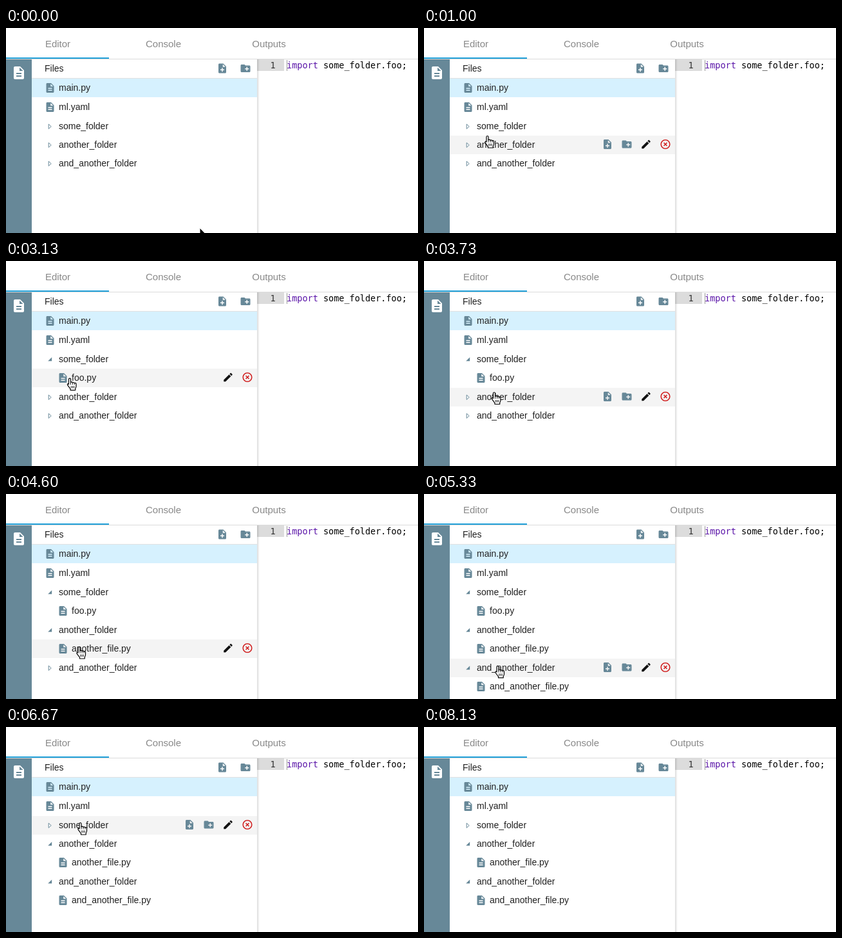
Recreate the animation shown at these times as an HTML page. Size 640 px wide and 320 px high, loop 8190 ms.

```html
<!DOCTYPE html>
<html lang="en">
<head>
<meta charset="utf-8">
<title>File tree</title>
<style>
html, body { margin: 0; width: 100%; height: 100%; overflow: hidden; background: #fff; }
svg { display: block; width: 640px; height: 320px; }
text { font: 14px "Liberation Sans", Arial, sans-serif; fill: #212121; white-space: pre; }
.tab { font-size: 15px; fill: #888; text-anchor: middle; }
.code { font: 13.5px "DejaVu Sans Mono", monospace; fill: #000; }
</style>
</head>
<body>
<svg viewBox="0 0 640 320">
  <defs>
    <linearGradient id="edge">
      <stop stop-opacity=".14"/><stop offset="1" stop-opacity="0"/>
    </linearGradient>
    <path id="file" d="M14 2H6c-1.1 0-1.99.9-1.99 2L4 20c0 1.1.89 2 1.99 2H18c1.1 0 2-.9 2-2V8l-6-6zm2 16H8v-2h8v2zm0-4H8v-2h8v2zm-3-5V3.5L18.5 9H13z"/>
    <path id="addFile" d="M14 2H6c-1.1 0-1.99.9-1.99 2L4 20c0 1.1.89 2 1.99 2H18c1.1 0 2-.9 2-2V8l-6-6zm2 14h-3v3h-2v-3H8v-2h3v-3h2v3h3v2zm-3-7V3.5L18.5 9H13z"/>
    <path id="addFolder" d="M20 6h-8l-2-2H4c-1.11 0-1.99.89-1.99 2L2 18c0 1.11.89 2 2 2h16c1.11 0 2-.89 2-2V8c0-1.11-.89-2-2-2zm-1 8h-3v3h-2v-3h-3v-2h3V9h2v3h3v2z"/>
    <path id="edit" d="M3 17.25V21h3.75L17.81 9.94l-3.75-3.75L3 17.25zM20.71 7.04c.39-.39.39-1.02 0-1.41l-2.34-2.34c-.39-.39-1.02-.39-1.41 0l-1.83 1.83 3.75 3.75 1.83-1.83z"/>
    <path id="remove" d="M14.59 8L12 10.59 9.41 8 8 9.41 10.59 12 8 14.59 9.41 16 12 13.41 14.59 16 16 14.59 13.41 12 16 9.41 14.59 8zM12 2C6.47 2 2 6.47 2 12s4.47 10 10 10 10-4.47 10-10S17.53 2 12 2zm0 18c-4.41 0-8-3.59-8-8s3.59-8 8-8 8 3.59 8 8-3.59 8-8 8z"/>
    <path id="arrow" d="M0 0V15l3.4-3.3 2.3 5.3 2.3-1-2.2-5.2H10.5Z" stroke="#fff"/>
    <g id="hand" stroke="#000" stroke-linejoin="round">
      <path fill="#fff" stroke-width="1.2" d="M-1.5 1.5Q-1.5 0 0 0T1.5 1.5V6.5Q1.8 5.7 3 5.7T4.6 7Q5 6.4 6 6.4T7.5 7.7Q7.8 7.2 8.6 7.2Q10 7.2 10 9V12.5Q10 14 8.7 16V18.5H1V16.5Q-1 14-3.4 10.6Q-4 9-3 8.6Q-2 8.3-1.5 9.5Z"/>
      <path fill="none" stroke-width=".9" d="M2.3 12v3.5M4.5 12v3.5M6.7 12v3.5M1.5 6v4M4.6 7v3M7.5 8v2"/>
    </g>
  </defs>

  <rect width="640" height="320" fill="#fff"/>
  <rect y="48" width="640" height="1" fill="#dcdcdc"/>
  <rect y="46" width="160" height="2" fill="#1e9fd8"/>
  <text class="tab" x="80.5" y="30">Editor</text>
  <text class="tab" x="244.5" y="30">Console</text>
  <text class="tab" x="408.5" y="30">Outputs</text>

  <rect y="49" width="40" height="271" fill="#678898"/>
  <use href="#file" x="8" y="58" fill="#fff"/>
  <text x="60" y="68">Files</text>
  <rect x="40" y="78" width="350" height="1" fill="#e2e2e2"/>

  <rect x="390" y="49" width="42" height="18" fill="#dcdcdc"/>
  <rect x="390" y="49" width="4" height="271" fill="url(#edge)"/>
  <text class="code" x="410.5" y="63" style="fill:#333">1</text>
  <text class="code" x="436" y="63"><tspan fill="#5a14a8">import</tspan> some_folder.foo;</text>
  <rect x="436" y="50" width="1" height="17" fill="#999"/>

  <g id="head"></g>
  <g id="tree"></g>
  <use id="pointer"/>
</svg>
<script>
const LOOP = 8190, STEP = 200 / 3, SLATE = '#678898';
const $ = id => document.getElementById(id);

// Pointer path: time, x, y of its tip
const path = [
  [0, 301, 312], [70, 300, 311], [270, 254, 284], [470, 186, 240], [670, 124, 203], [870, 102, 184],
  [1000, 98.5, 168.5], [1140, 98, 157], [1600, 98, 150], [1930, 98, 150], [2200, 99, 151],
  [2800, 99, 151], [3130, 99, 183], [3340, 100, 188], [3600, 108, 204], [4130, 112, 208],
  [4470, 112, 208], [4600, 113.5, 238.5], [4850, 114, 246], [5200, 114.5, 267], [5330, 114.5, 268.5],
  [5530, 115, 262], [5930, 115, 165], [6130, 115, 148], [6200, 115.5, 149.5], [6930, 115.5, 149.5],
  [7140, 122, 238], [7200, 122, 238], [7340, 130, 275], [7410, 140, 300], [7470, 155, 340], [LOOP, 155, 340]
];

// Each folder is open during [from, to)
const folders = [
  ['some_folder', 'foo.py', 2390, 6520],
  ['another_folder', 'another_file.py', 3860, LOOP],
  ['and_another_folder', 'and_another_file.py', 5320, LOOP]
];

const icon = (name, cx, cy, fill = SLATE, s = .75) =>
  `<use href="#${name}" fill="${fill}" transform="translate(${cx - 12 * s} ${cy - 12 * s}) scale(${s})"/>`;

function pointerAt(t) {
  const i = Math.max(1, path.findIndex(p => p[0] > t));
  const [a, b] = [path[i - 1], path[i]];
  const k = (t - a[0]) / (b[0] - a[0]);
  return [a[1] + (b[1] - a[1]) * k, a[2] + (b[2] - a[2]) * k];
}

function rowsAt(t) {
  const rows = [{ name: 'main.py', x: 82, selected: true }, { name: 'ml.yaml', x: 82 }];
  for (const [name, child, from, to] of folders) {
    const open = t >= from && t < to;
    rows.push({ name, x: 82, folder: true, open });
    if (open) rows.push({ name: child, x: 102 });
  }
  let y = 93.3;
  for (const r of rows) {
    r.y = Math.round(y);
    y += r.folder ? 29.1 : 29.8;
  }
  return rows;
}

function drawRow(r, hover) {
  const { x, y } = r;
  const fill = r.selected ? '#d6f1fe' : hover ? '#f4f4f4' : 'none';
  let out = `<rect x="40" y="${y - 14}" width="350" height="29" fill="${fill}"/>`;
  if (!r.folder) out += icon('file', x - 13.5, y + .5);
  else if (r.open) out += `<path d="M71.2 ${y - 2.8}v6h-6z" fill="${SLATE}"/>`;
  else out += `<path d="M66.2 ${y - 3}l4 3.7-4 3.7z" fill="#fff" stroke="${SLATE}"/>`;
  out += `<text x="${x}" y="${y + 5}">${r.name}</text>`;
  if (hover) {
    if (r.folder) out += icon('addFile', 285, y - .5) + icon('addFolder', 315, y - .5);
    out += icon('edit', 345, y - .5, '#111') + icon('remove', 375, y - .5, '#d01c1c');
  }
  return out;
}

function draw(now) {
  const t = Math.floor((now % LOOP + 4) / STEP) * STEP;
  const [px, py] = pointerAt(Math.min(t, LOOP - 1));
  const rows = rowsAt(t);
  const over = rows.find(r => py >= r.y - 14 && py < r.y + 15.5);
  $('tree').innerHTML = rows.map(r => drawRow(r, r === over)).join('');
  $('pointer').setAttribute('href', over ? '#hand' : '#arrow');
  $('pointer').setAttribute('transform', `translate(${px} ${py})`);
}

$('head').innerHTML = icon('addFile', 336, 63) + icon('addFolder', 372, 63);
const start = performance.now();
function tick() {
  draw(performance.now() - start);
  requestAnimationFrame(tick);
}
tick();
</script>
</body>
</html>
```
